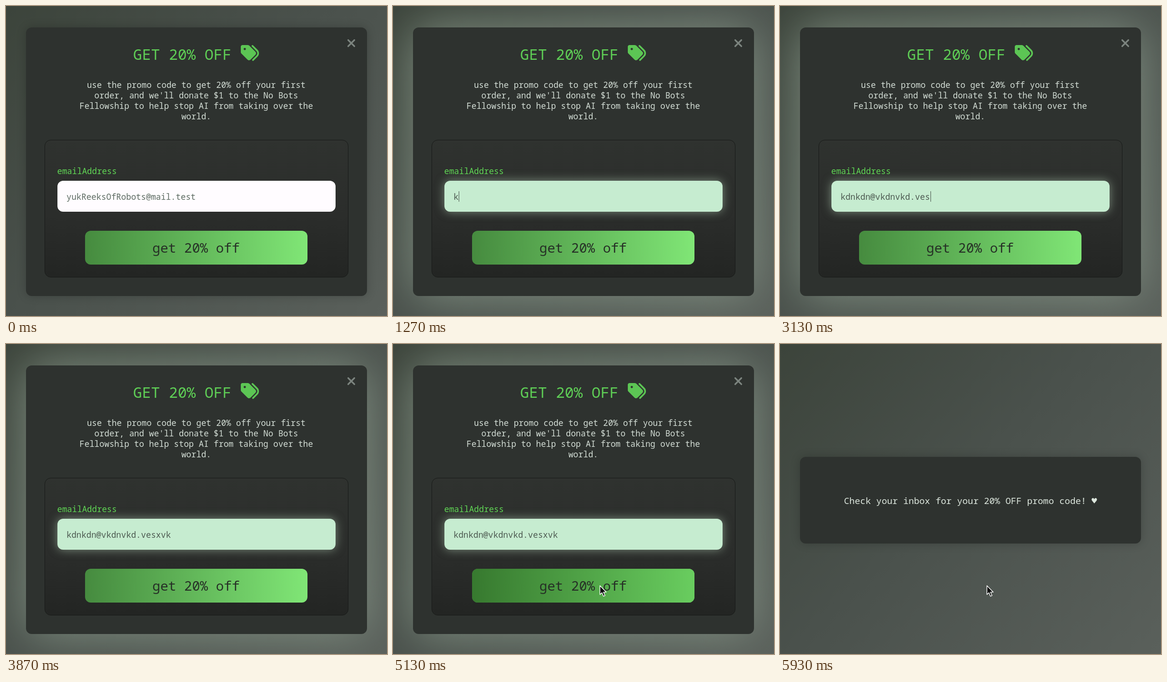
These frames come from a looping animation (800 by 651 pixels, 6000 ms). An HTML page:

```html
<!DOCTYPE html>
<html lang="en">
<head>
<meta charset="utf-8">
<title>Promo dialog</title>
<style>
  html, body { margin: 0; width: 100%; height: 100%; overflow: hidden; }
  #stage {
    position: relative; width: 800px; height: 651px; overflow: hidden;
    background: linear-gradient(135deg, #3c443b, #4a514c 46%, #5a605b);
  }
  #stage div, svg { position: absolute; box-sizing: border-box; }
  #modal { left: 42px; width: 716px; border-radius: 12px; background: #2e322f; }
  #panel {
    left: 81px; top: 281px; width: 638px; height: 289px;
    border: 1.5px solid #181a18; border-radius: 13px;
    background: linear-gradient(#2f322f, #2b2d2b 55%, #232523);
  }
  #field { left: 108px; top: 367px; width: 584px; height: 65px; border-radius: 12px; }
  #button {
    left: 165.5px; top: 471.5px; width: 467.5px; height: 71.5px; border-radius: 12px;
    background: linear-gradient(90deg, #468b3f, #80e676);
    overflow: hidden;
  }
  #hover { inset: 0; background: linear-gradient(90deg, #37792f, #69cd5f); }
  svg { left: 0; top: 0; }
  text { font-family: "Noto Sans Mono", "DejaVu Sans Mono", monospace; font-size: 17.4px; white-space: pre; }
  .mid { text-anchor: middle; }
  .title { font-size: 31.25px; fill: #5fcf56; }
  .copy { font-weight: 300; fill: #d3ddd5; }
  .label { font-weight: 500; fill: #60d655; }
  .action { font-size: 27.8px; fill: #262f26; }
</style>
</head>
<body>
<div id="stage">
  <div id="modal"></div>
  <div id="form">
    <div id="panel"></div>
    <div id="field"></div>
    <div id="button"><div id="hover"></div></div>
  </div>
  <svg width="800" height="651">
    <g id="content">
      <text class="title" x="267" y="113">GET 20% OFF</text>
      <path fill="#5cc554" transform="translate(493 79.6) scale(.0745)" d="M345 39L473 168c52 53 52 138 0 191L361 473c-9 9-25 9-34 0s-9-24-0-34L439 326c34-34 34-89 0-124L311 73c-9-9-9-25 0-34s25-9 34 0zM0 230V80C0 53 21 32 48 32H198c17 0 33 7 45 19l168 168c25 25 25 65 0 90L277 443c-25 25-65 25-90 0l-168-168C7 263 0 247 0 230zM144 144a32 32 0 1 0-64 0 32 32 0 1 0 64 0z"/>
      <path d="M718.5 71.5l13 13m0-13l-13 13" stroke="#7c847f" stroke-width="3.2" stroke-linecap="round"/>
      <g class="copy mid">
        <text x="399.5" y="172">use the promo code to get 20% off your first</text>
        <text x="399.5" y="194">order, and we'll donate $1 to the No Bots</text>
        <text x="399.5" y="216">Fellowship to help stop AI from taking over the</text>
        <text x="399.5" y="238">world.</text>
      </g>
      <text class="label" x="107.5" y="353">emailAddress</text>
      <text id="entry" x="127" y="407"></text>
      <path id="caret" d="M.5 389v22" stroke="#454f48"/>
      <text class="action mid" x="399" y="518">get 20% off</text>
    </g>
    <text id="thanks" class="mid" x="400">Check your inbox for your 20% OFF promo code! ♥</text>
    <path id="pointer" d="M0 0V18.5L4.2 14.7 7.4 22.2 10.6 20.8 7.5 13.6H13.2Z" fill="#080908" stroke="#fff" stroke-width="1.4" stroke-linejoin="round"/>
  </svg>
</div>
<script>
const LOOP = 6000;
const FOCUS = 200, TYPE = 1240, POINT = 4300, HOVER = 4420, SENT = 5390;
const HINT = 'yukReeksOfRobots@mail.test';
const EMAIL = 'kdnkdn@vkdnvkd.vesxvk';
const CHAR = 10.44;

const el = Object.fromEntries([...document.querySelectorAll('[id]')].map(e => [e.id, e]));
const mix = (a, b, k) => a + (b - a) * k;
const rgb = (a, b, k) => `rgb(${a.map((v, i) => Math.round(mix(v, b[i], k)))})`;
const show = (e, on) => { e.style.visibility = on ? 'visible' : 'hidden'; };

// Eased progress from 0 to 1 over a span of time
function ease(t, start, length) {
  const k = Math.min(1, Math.max(0, (t - start) / length));
  return 1 - (1 - k) ** 2.2;
}

// Typing speeds up after the first nine letters
const keyTime = i => i < 9 ? TYPE + i * 140 : 2440 + (i - 9) * 80;
const keys = [...EMAIL].map((_, i) => keyTime(i));

function drawModal(t, sent) {
  const grow = ease(t, 5400, 500);
  const height = sent ? mix(106, 182, grow) : 564;
  const glow = sent ? 1 - grow : ease(t, FOCUS, 500);
  const s = el.modal.style;
  s.top = (sent ? 328 - height / 2 : 45) + 'px';
  s.height = height + 'px';
  s.boxShadow = `0 0 20px rgba(0,0,0,${.2 * (1 - glow)}), 0 0 100px rgba(134,150,135,${.9 * glow})`;
  el.thanks.style.fontSize = mix(17.4, 18.85, grow) + 'px';
  el.thanks.style.fill = rgb([12, 15, 12], [222, 232, 223], grow);
  el.thanks.setAttribute('y', mix(334, 336, grow));
}

function drawField(t, sent) {
  const focus = ease(t, FOCUS, 500);
  el.field.style.background = rgb([255, 252, 255], [198, 236, 208], focus);
  el.field.style.boxShadow = `0 0 20px rgba(200,232,202,${.5 * focus})`;

  const count = keys.filter(k => k <= t).length;
  el.entry.textContent = count ? EMAIL.slice(0, count) : HINT;
  el.entry.style.fill = count ? '#4d5a51' : '#5d6b62';

  const idle = t - (count ? keys[count - 1] : FOCUS);
  show(el.caret, !sent && idle >= 0 && idle % 1000 < 500);
  el.caret.setAttribute('transform', `translate(${Math.round(128 + count * CHAR)} 0)`);
}

function drawPointer(t) {
  const k = ease(t, POINT, 450);
  show(el.pointer, t >= POINT);
  el.pointer.setAttribute('transform', `translate(${mix(462, 434.5, k)} ${mix(450, 507.5, k)})`);
  el.hover.style.opacity = ease(t, HOVER, 300);
}

function render(t) {
  const sent = t >= SENT;
  show(el.form, !sent);
  show(el.content, !sent);
  show(el.thanks, sent);
  drawModal(t, sent);
  drawField(t, sent);
  drawPointer(t);
}

const begin = performance.now();
function tick() {
  render((performance.now() - begin) % LOOP);
  requestAnimationFrame(tick);
}
tick();
</script>
</body>
</html>
```
